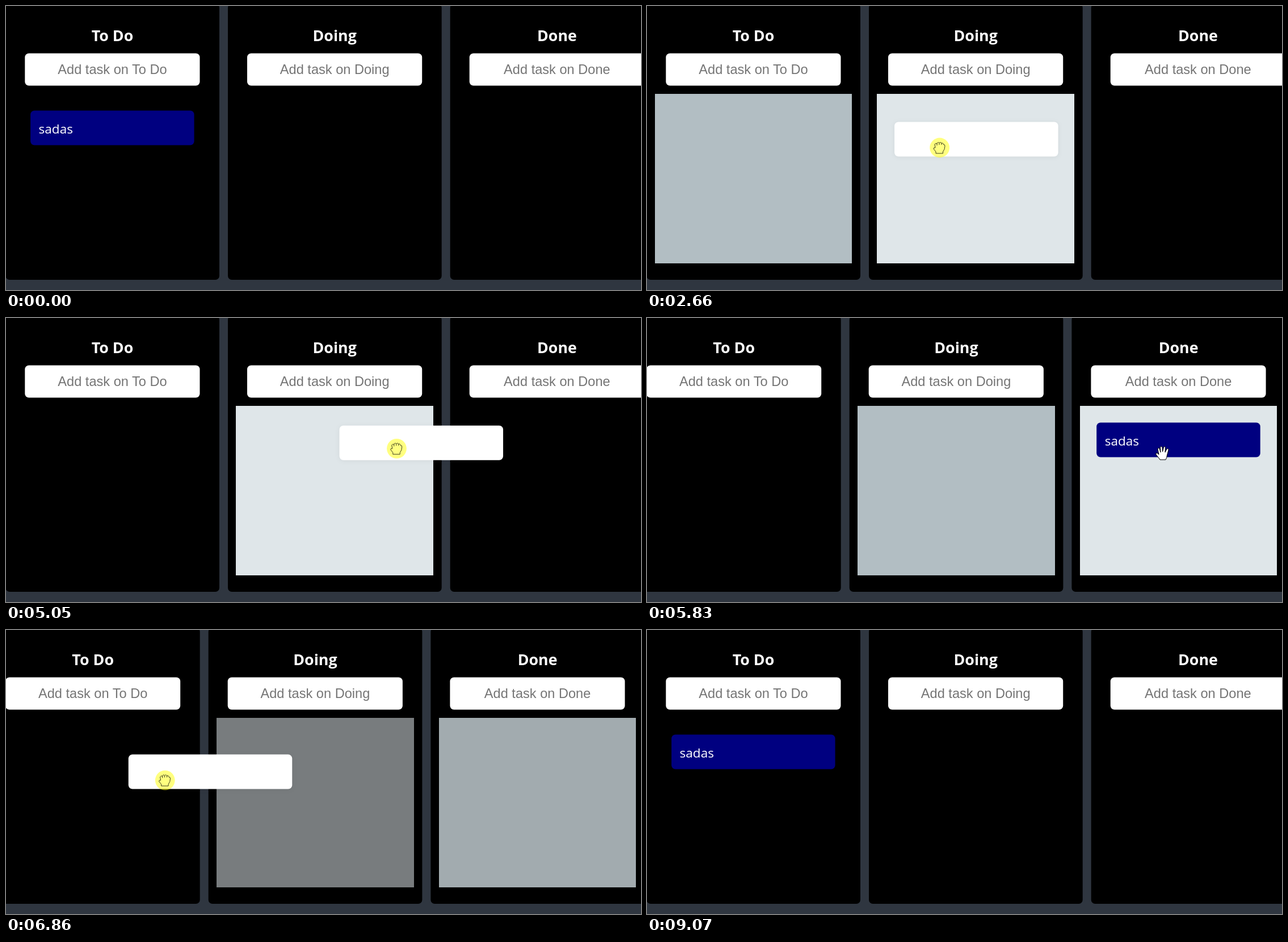
An HTML page for the animation above (9.67 s loop, 1119 by 501 pixels).

```html
<!DOCTYPE html>
<html lang="en">
<head>
<meta charset="utf-8">
<title>Task board</title>
<style>
  html, body { margin: 0; width: 100%; height: 100%; overflow: hidden; background: #2f3640; }
  svg { display: block; width: 1119px; height: 501px; }
  .title { font: bold 26.8px "Open Sans", "Noto Sans", sans-serif; fill: #fff; text-anchor: middle; }
  .hint { font: 23.6px "Liberation Sans", Arial, sans-serif; fill: #757575; text-anchor: middle; }
  .task { font: 22.5px "Open Sans", "Noto Sans", sans-serif; fill: #fff; }
  .list { shape-rendering: crispEdges; }
  .held { filter: drop-shadow(0 1px 4px rgba(0, 0, 0, .06)); }
  #pointer path { stroke: #000; stroke-linejoin: round; }
</style>
</head>
<body>
<svg viewBox="0 0 1119 501">
  <g id="board"></g>
  <g id="card">
    <rect width="288.5" height="61" rx="7"/>
    <text class="task" x="14.5" y="40">sadas</text>
  </g>
  <g id="pointer">
    <path id="arrow" fill="#fff" d="M0 0V23.5L5.5 18.5L9.3 26.8L13 25.2L9.5 17.3H17Z"/>
    <path id="hand" fill="#fff" d="M-6 9L-11 3Q-12 0 -9 0L-6 3L-8 -7Q-7 -10 -5 -8L-3 -1L-3.5 -10Q-2 -13 0 -10L.5 -2L2.5 -10Q4 -13 5.5 -9.5L5 -1L8 -7Q11 -9 11 -5L8.5 4Q8 9 6 12H-4Z"/>
    <g id="fist">
      <circle cx=".7" r="17.4" fill="#ff0" fill-opacity=".5"/>
      <path fill="none" stroke-opacity=".75" d="M-6 10V7L-10 2Q-10 -1 -7 0L-8 -6Q-6 -9 -4 -7Q-3 -11 0 -8.5Q2 -11 4 -8Q7 -9 7.5 -5.5Q10 -6 10 -3Q10 3 6.5 7V10ZM-4 -7V-4M0 -8V-5M4 -8V-5"/>
    </g>
  </g>
</svg>
<script>
const LOOP = 9670, PITCH = 391.7, MAX_SCROLL = 34.3, FADE = 300, LANDING = 328;
const NONE = [0, 0, 0], OVER = [223, 230, 233], FROM = [178, 190, 195];
const NAMES = ["To Do", "Doing", "Done"];
const LIST = { x: 13.7, width: 347.5 }, CARD = { x: 43.1, y: 184.5, width: 288.5, height: 61 };
const ENTER = 190, LEAVE = 9060;

// Eased pointer moves: begin, end, x, y
const ORIGIN = [780, 477];
const MOVES = [
  [ENTER, 330, 574, 414],
  [730, 1400, 92, 221], [1400, 1560, 122, 230],
  [1760, 2240, 502, 312], [2240, 2660, 515, 250],
  [3010, 3550, 554, 414], [4160, 4600, 535, 225],
  [4760, 5420, 908, 238], [5830, 6400, 856, 230],
  [6528, 6985, 150, 273], [7290, 7770, 212, 290],
  [7770, 8040, 577, 457], [8370, LEAVE, 1060, -30]
];

// Each drag: pick-up time, release time, columns
const DRAGS = [
  { start: 1753, drop: 3000, from: 0, to: 1 },
  { start: 4750, drop: 5497, from: 1, to: 2 },
  { start: 6510, drop: 7292, from: 2, to: 0 }
];

const $ = id => document.getElementById(id);
const ramp = (t, a, b) => Math.min(1, Math.max(0, (t - a) / (b - a)));
const smooth = p => p * p * (3 - 2 * p);
const mix = (a, b, p) => a.map((v, i) => v + (b[i] - v) * p);
const move = (el, x, y) => el.setAttribute("transform", `translate(${x} ${y})`);
const show = (id, on) => $(id).setAttribute("visibility", on ? "visible" : "hidden");

const scrollAt = t => MAX_SCROLL * (ramp(t, 5190, 5560) ** 1.5 - ramp(t, 6890, 7290) ** 1.5);
const slot = (column, t) => [CARD.x + column * PITCH - scrollAt(t), CARD.y];
const pointerAt = t => MOVES.reduce(
  (pos, [begin, end, ...goal]) => mix(pos, goal, smooth(ramp(t, begin, end))), ORIGIN);

function cardAt(t) {
  const drag = DRAGS.findLast(d => d.start <= t);
  if (!drag) return { pos: slot(0, t) };
  const { start, drop, from, to } = drag;
  if (t >= drop + LANDING) return { pos: slot(to, t) };
  const home = slot(from, start), grab = pointerAt(start);
  const carried = pointerAt(Math.min(t, drop)).map((v, i) => v - grab[i] + home[i]);
  const left = 1 - ramp(t, drop, drop + LANDING);
  return { pos: mix(carried, slot(to, t), 1 - left ** 3), drag, pressed: t < drop };
}

// Colour a list is heading for: under the card, the card's home, or neither
function listGoal(column, t) {
  const { pos, drag, pressed } = cardAt(t);
  if (!drag) return NONE;
  const center = pos[0] + CARD.width / 2 + scrollAt(t) - LIST.x - column * PITCH;
  const over = pressed ? center > 0 && center < LIST.width : column === drag.to;
  return over ? OVER : column === drag.from ? FROM : NONE;
}

const fades = NAMES.map((_, column) => {
  const found = [];
  for (let t = 0, last = NONE; t < LOOP; t++) {
    const goal = listGoal(column, t);
    if (goal !== last) found.push([t, goal]);
    last = goal;
  }
  return found;
});

function listColor(column, t) {
  return fades[column].reduce((color, [start, goal], i, all) => {
    const until = Math.min(t, all[i + 1]?.[0] ?? t);
    return mix(color, goal, smooth(ramp(until, start, start + FADE)));
  }, NONE);
}

$("board").innerHTML = NAMES.map((name, i) => `
  <g transform="translate(${i * PITCH})">
    <rect x="-.7" y="-4" width="376.7" height="487" rx="7"/>
    <text class="title" x="187.5" y="62">${name}</text>
    <rect x="33.3" y="83.5" width="308.2" height="57" rx="7" fill="#fff"/>
    <text class="hint" x="187.5" y="120">Add task on ${name}</text>
    <rect class="list" x="${LIST.x}" y="155" width="${LIST.width}" height="299"/>
  </g>`).join("");
const lists = document.querySelectorAll(".list");

function draw(t) {
  move($("board"), -scrollAt(t), 0);
  lists.forEach((el, i) => el.setAttribute("fill", `rgb(${listColor(i, t).map(Math.round)})`));

  const { pos, drag, pressed } = cardAt(t);
  move($("card"), ...pos);
  $("card").setAttribute("class", drag ? "held" : "");
  $("card").firstElementChild.setAttribute("fill", drag ? "#fff" : "#000080");

  const visible = t >= ENTER && t < LEAVE;
  const [x, y] = pointerAt(t);
  const dx = x - pos[0], dy = y - pos[1];
  const hover = dx > 0 && dx < CARD.width && dy > 0 && dy < CARD.height;
  move($("pointer"), x, y);
  show("fist", visible && pressed);
  show("hand", visible && !pressed && hover);
  show("arrow", visible && !pressed && !hover);
}

let begin;
function tick(now) {
  begin ??= now;
  draw((now - begin) % LOOP);
  requestAnimationFrame(tick);
}
requestAnimationFrame(tick);
</script>
</body>
</html>
```
